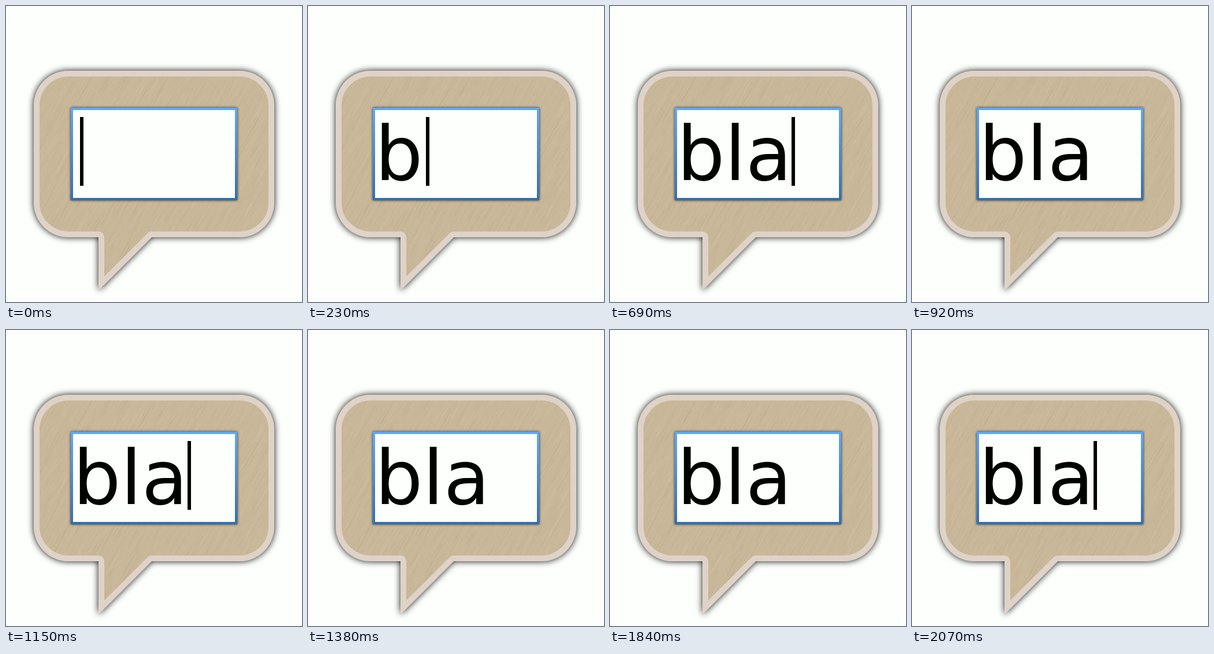
These frames come from a looping animation (512 by 512 pixels, 2300 ms). An HTML page with a canvas:

```html
<!DOCTYPE html>
<html lang="en">
<head>
<meta charset="utf-8">
<title>Typing bubble</title>
<style>
  html, body { margin: 0; width: 100%; height: 100%; overflow: hidden; background: #fdfffc; }
  canvas { display: block; width: 512px; height: 512px; }
</style>
</head>
<body>
<canvas id="stage" width="512" height="512"></canvas>
<script>
const SIZE = 512;
const STEP = 230;
const STEPS = 10;
const WORD = "bla";
const CARET_X = [128, 204, 235, 314];

const ctx = document.getElementById("stage").getContext("2d");

function makeRandom(seed) {
  return () => {
    seed = (seed * 1664525 + 1013904223) >>> 0;
    return seed / 4294967296;
  };
}

function bubblePath() {
  const p = new Path2D();
  p.moveTo(108, 112);
  p.arcTo(464, 112, 464, 400, 60);
  p.arcTo(464, 400, 252, 400, 60);
  p.lineTo(252, 400);
  p.lineTo(160, 492);
  p.lineTo(160, 400);
  p.arcTo(48, 400, 48, 112, 60);
  p.arcTo(48, 112, 108, 112, 60);
  p.closePath();
  return p;
}

function withShadow(c, color, blur, draw) {
  c.save();
  c.shadowColor = color;
  c.shadowBlur = blur;
  draw();
  c.restore();
}

// Fine brushed grain running up to the right.
function drawGrain(c) {
  const random = makeRandom(71);
  c.lineWidth = 1;
  for (let i = 0; i < 2600; i++) {
    const x = random() * 460 + 20;
    const y = random() * 420 + 90;
    const length = 15 + random() * 50;
    const alpha = 0.05 + random() * 0.13;
    c.strokeStyle = random() < 0.5
      ? `rgba(225,209,180,${alpha})`
      : `rgba(165,145,112,${alpha})`;
    c.beginPath();
    c.moveTo(x, y);
    c.lineTo(x + length * 0.5, y - length * 0.866);
    c.stroke();
  }
}

function drawBubble(c) {
  const bubble = bubblePath();
  c.fillStyle = "#c8b799";
  withShadow(c, "rgba(0,0,0,0.95)", 12, () => c.fill(bubble));
  c.save();
  c.clip(bubble);
  drawGrain(c);
  c.lineJoin = "round";
  c.lineWidth = 20;
  c.strokeStyle = "#dfd2c7";
  c.stroke(bubble);
  c.restore();
}

function drawField(c) {
  const border = c.createLinearGradient(0, 176, 0, 336);
  border.addColorStop(0, "#5ca9fb");
  border.addColorStop(1, "#2e6fb9");
  c.fillStyle = border;
  withShadow(c, "rgba(0,0,0,0.8)", 4, () => {
    c.beginPath();
    c.roundRect(112, 176, 288, 160, 1);
    c.fill();
  });
  c.fillStyle = "#fdfffc";
  c.fillRect(116, 180, 280, 152);
}

function makeBackdrop() {
  const canvas = document.createElement("canvas");
  canvas.width = canvas.height = SIZE;
  const c = canvas.getContext("2d");
  c.fillStyle = "#fdfffc";
  c.fillRect(0, 0, SIZE, SIZE);
  drawBubble(c);
  drawField(c);
  return canvas;
}

const backdrop = makeBackdrop();

function render(time) {
  const step = Math.floor(time / STEP) % STEPS;
  const typed = Math.min(step, WORD.length);
  const caretOn = step <= WORD.length || step % 2 === 1;

  ctx.drawImage(backdrop, 0, 0);
  ctx.fillStyle = "#000200";
  ctx.font = '130px "DejaVu Sans", sans-serif';
  ctx.fillText(WORD.slice(0, typed), 116, 301);
  if (caretOn) ctx.fillRect(CARET_X[typed], 192, 6, 119);
}

let start;
function tick(now) {
  start ??= now;
  render(Math.max(0, now - start));
  requestAnimationFrame(tick);
}
render(0);
requestAnimationFrame(tick);
</script>
</body>
</html>
```
